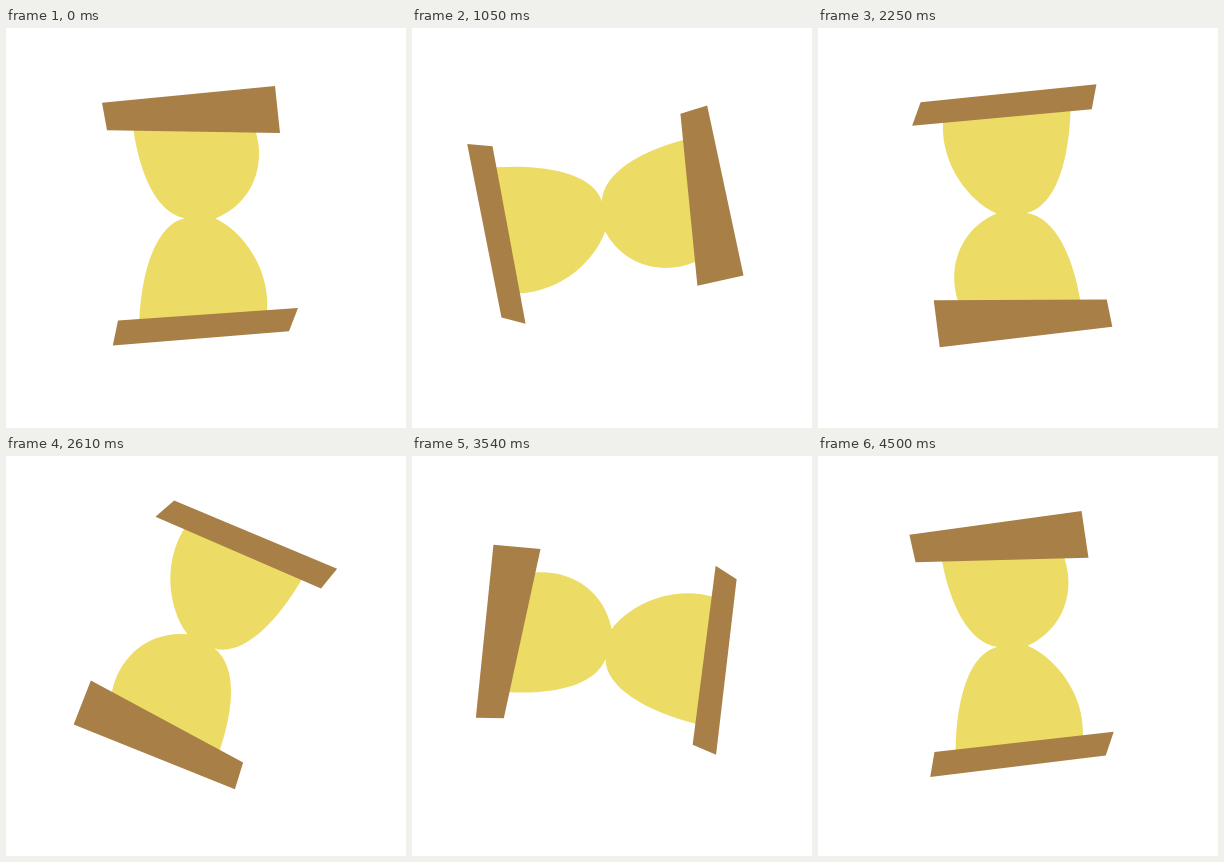
Write an HTML page with a canvas that moves like this. It is 400 px wide and 400 px high and loops after 4.53 s.

```html
<!DOCTYPE html>
<html lang="en">
<head>
<meta charset="utf-8">
<title>Turning hourglass</title>
<style>
  html, body { margin: 0; width: 100%; height: 100%; overflow: hidden; background: #fff; }
  canvas { display: block; width: 400px; height: 400px; }
</style>
</head>
<body>
<canvas id="stage" width="400" height="400"></canvas>
<script>
const ctx = document.getElementById('stage').getContext('2d');
const LOOP = 4530, STEP = 30;
const PIVOT = [194, 187.8];
const WOOD = '#a87f47', SAND = '#ecdc65';

const topBar = [[96, 74.7], [269, 58], [274, 105], [101, 102.2]];
const bottomBar = [[112, 292.6], [292, 280], [283, 303.2], [106.8, 317.5]];

// Both bulbs as one outline; its ends are tucked under the bars.
const glass = new Path2D(`
  M127 94 L127.5 102.5
  C134 146 150.5 185 179 190.3
  C151 196 136 240 133.3 291.5
  L133 299 L261 291 L261 283
  C264.5 241 237 203.5 209.5 190.5
  C247 175 259.5 137.5 250 104.5
  L249 94 Z`);

function polygon(points, color) {
  ctx.fillStyle = color;
  ctx.beginPath();
  points.forEach(([x, y]) => ctx.lineTo(x, y));
  ctx.closePath();
  ctx.fill();
}

function draw(time) {
  const step = Math.floor((time % LOOP) / STEP);
  ctx.setTransform(1, 0, 0, 1, 0, 0);
  ctx.fillStyle = '#fff';
  ctx.fillRect(0, 0, 400, 400);
  ctx.translate(...PIVOT);
  ctx.rotate(2 * Math.PI * step * STEP / LOOP);
  ctx.translate(-PIVOT[0], -PIVOT[1]);
  ctx.fillStyle = SAND;
  ctx.fill(glass);
  polygon(topBar, WOOD);
  polygon(bottomBar, WOOD);
}

const start = performance.now();
function tick() {
  draw(performance.now() - start);
  requestAnimationFrame(tick);
}
tick();
</script>
</body>
</html>
```
